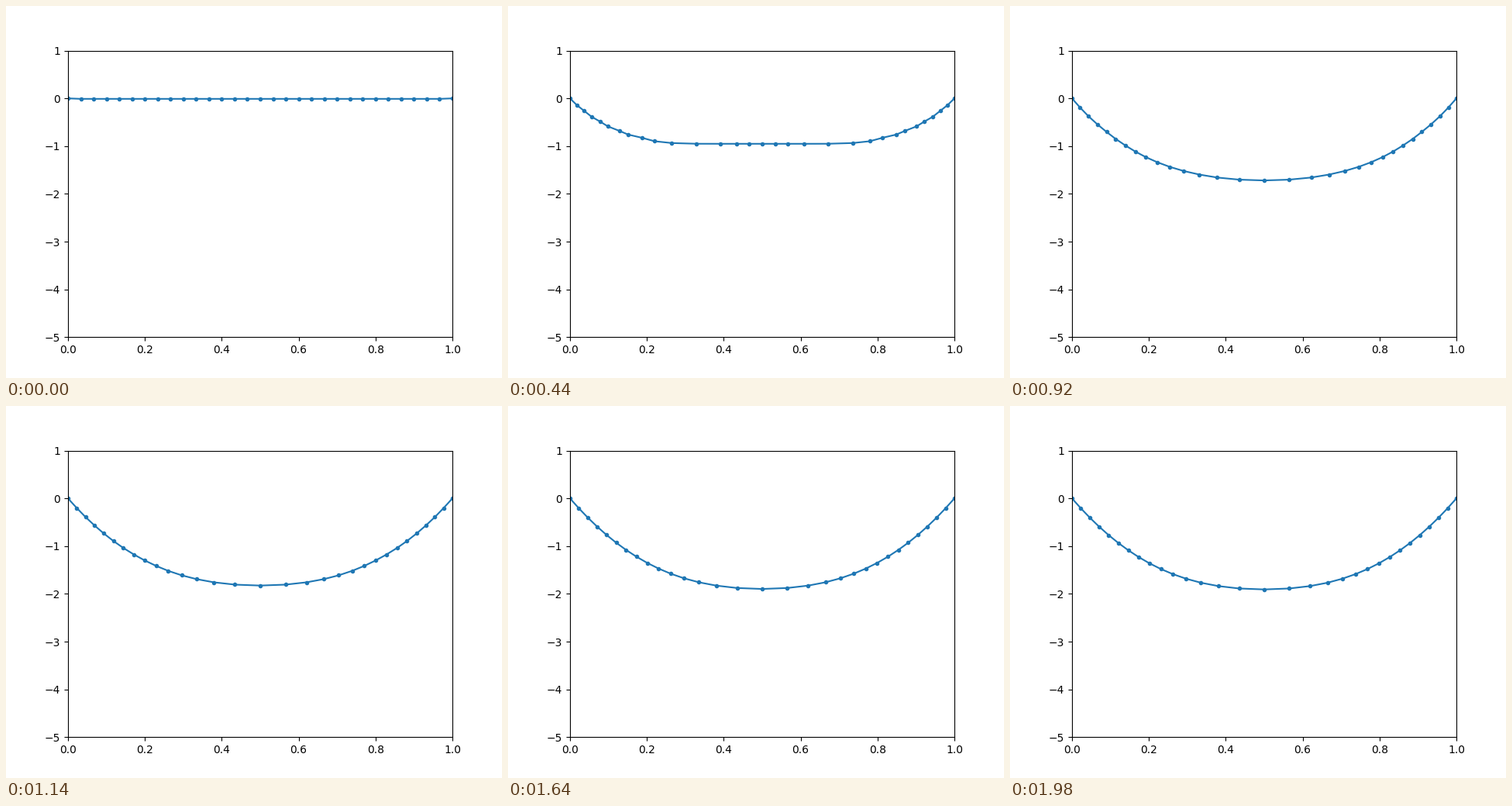
These frames come from a looping animation (640 by 480 pixels, 2 s). A matplotlib script:

```python
import numpy as np
import matplotlib.pyplot as plt
from matplotlib.animation import FuncAnimation

FRAMES, STEP_MS = 100, 20
BEADS = 31

# All in axis units per step
GRAVITY = 0.01
DRAG = 0.8       # share of the velocity kept
STIFF = 0.91     # just past the stable limit, so the links keep jittering
REST = 0.05      # link length at which a link pulls taut


def link_pull(pos):
    """Tension along each link; slack links do not push."""
    link = np.diff(pos, axis=0)
    length = np.hypot(link[:, 0], link[:, 1])
    stretch = np.maximum(length - REST, 0)
    return link * (STIFF * stretch / np.maximum(length, 1e-9))[:, None]


def simulate():
    """Bead positions of a rope dropped between two pins, for every frame."""
    pos = np.column_stack([np.linspace(0, 1, BEADS), np.zeros(BEADS)])
    vel = np.zeros_like(pos)
    path = []
    for _ in range(FRAMES):
        pull = link_pull(pos)
        vel[1:-1] = DRAG * vel[1:-1] + pull[1:] - pull[:-1]
        vel[1:-1, 1] -= GRAVITY
        pos = pos + vel
        path.append(pos)
    return path


path = simulate()

fig, ax = plt.subplots(figsize=(6.4, 4.8), dpi=100)
ax.set_xlim(0, 1)
ax.set_ylim(-5, 1)
rope, = ax.plot([], [], marker=".", color="C0")


def update(step):
    rope.set_data(*path[step].T)
    return rope,


anim = FuncAnimation(fig, update, frames=FRAMES, interval=STEP_MS,
                     repeat=True, repeat_delay=0)
plt.show()
```
